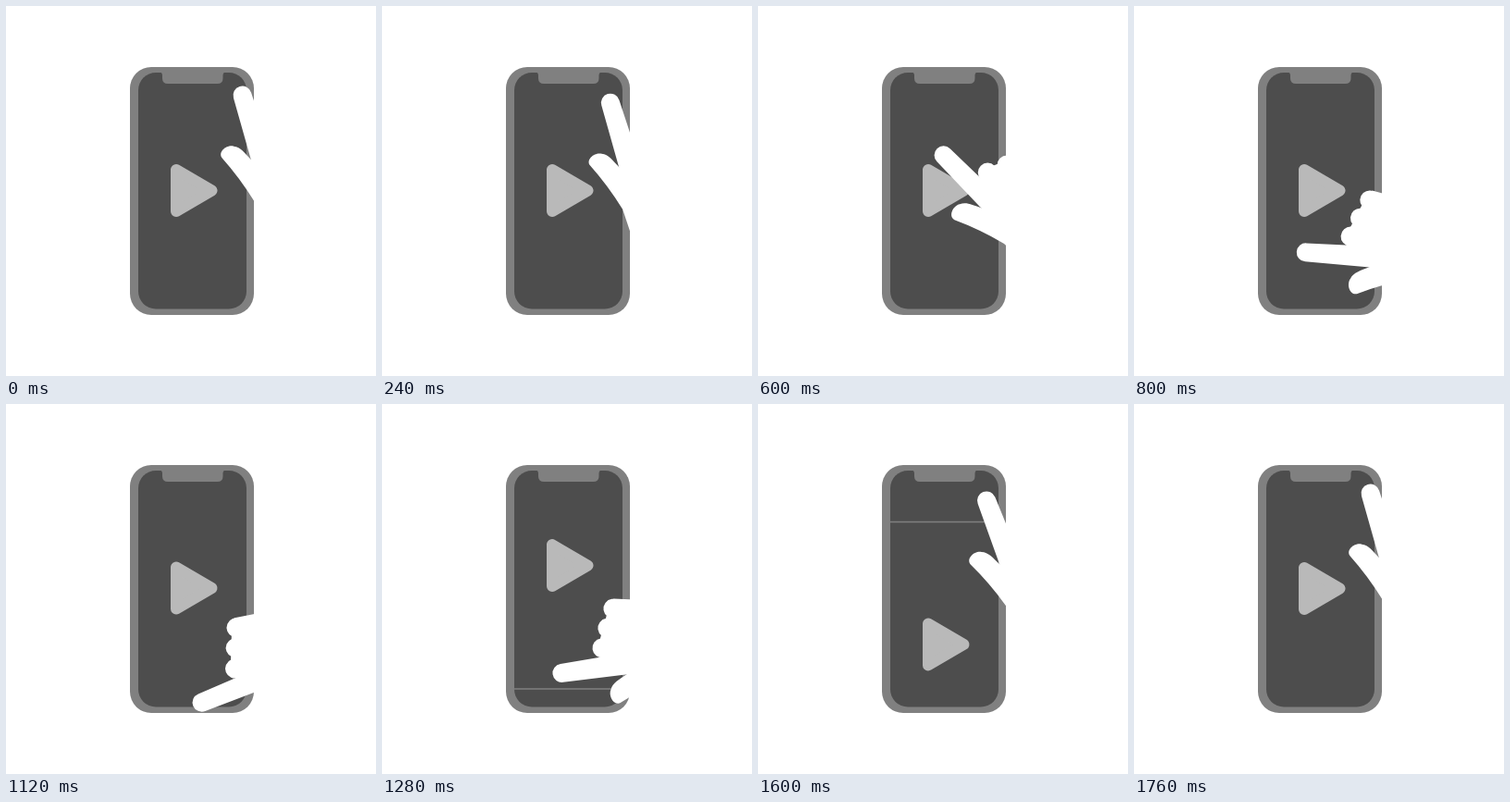
Write an HTML page that moves like this. It is 400 px wide and 400 px high and loops after 2.28 s.

```html
<!DOCTYPE html>
<html lang="en">
<head>
<meta charset="utf-8">
<title>Swipe gesture</title>
<style>
  html, body { margin: 0; width: 100%; height: 100%; overflow: hidden; background: #fff; }
  svg { display: block; width: 100vw; height: 100vh; }
</style>
</head>
<body>
<svg viewBox="0 0 400 400">
  <defs>
    <clipPath id="screen"><rect x="143" y="72" width="117" height="255.5" rx="19"/></clipPath>
    <path id="play" d="M184 177V222L222.5 199.5Z" fill="#b9b9b9" stroke="#b9b9b9" stroke-width="12" stroke-linejoin="round"/>
  </defs>

  <rect x="134" y="66" width="134" height="268" rx="23" fill="#808080"/>
  <g clip-path="url(#screen)">
    <rect x="143" y="72" width="117" height="256" fill="#4d4d4d"/>
    <g id="feed">
      <use href="#play"/>
      <path d="M143 333H260" stroke="#808080" stroke-width="1.5"/>
      <use href="#play" y="266"/>
    </g>
  </g>
  <path d="M166 71Q169 72 169 75V78Q169 84 175 84H228.5Q234.5 84 234.5 78V75Q234.5 72 237.5 71Z" fill="#808080"/>

  <!-- Hand in its own axes: index fingertip at 0,0, finger running along +x -->
  <g id="hand" fill="#fff">
    <path d="M0 -10A10 10 0 0 0 0 10L70 11.5H90V-11H48Z"/>
    <circle cx="47" cy="-20.5" r="10.5"/>
    <circle cx="56" cy="-41" r="10.5"/>
    <circle cx="65" cy="-61" r="10.5"/>
    <path d="M48 -8L42.5 -22L60.5 -63L67 -71.5L95 -66L150 -50L200 -40V20H150L114 21Q84 29 58 41
             C50 43 46 31 50 25C53 18 60 16 70 11Z"/>
  </g>
</svg>
<script>
const LOOP = 2280, STEP = 40, LAST = 1760;

const part = (t, from, to) => Math.min(1, Math.max(0, (t - from) / (to - from)));
const smooth = s => s * s * (3 - 2 * s);
const bump = (t, from, to) => Math.sin(Math.PI * part(t, from, to));

const hand = document.getElementById("hand");
const feed = document.getElementById("feed");

function draw(time) {
  const t = Math.min(LAST, Math.floor(time % LOOP / STEP) * STEP);

  // 0: hand raised, 1: hand lowered
  const low = smooth(part(t, 360, 1030)) - smooth(part(t, 1160, 1662));
  const angle = 73 - 95 * low;
  const x = 325 + 11.5 * low - 10 * bump(t, 0, 720);
  const y = 228 + 14 * low + 13 * bump(t, 0, 1120) + 3 * bump(t, 1120, 1760);
  hand.setAttribute("transform", `translate(${x} ${y}) rotate(${angle}) translate(-146 28)`);

  const scroll = 266 * smooth(part(t, 1070, 1760) ** 1.4);
  feed.setAttribute("transform", `translate(0 ${-scroll})`);
}

const start = performance.now();
function tick() {
  draw(performance.now() - start);
  requestAnimationFrame(tick);
}
tick();
</script>
</body>
</html>
```
